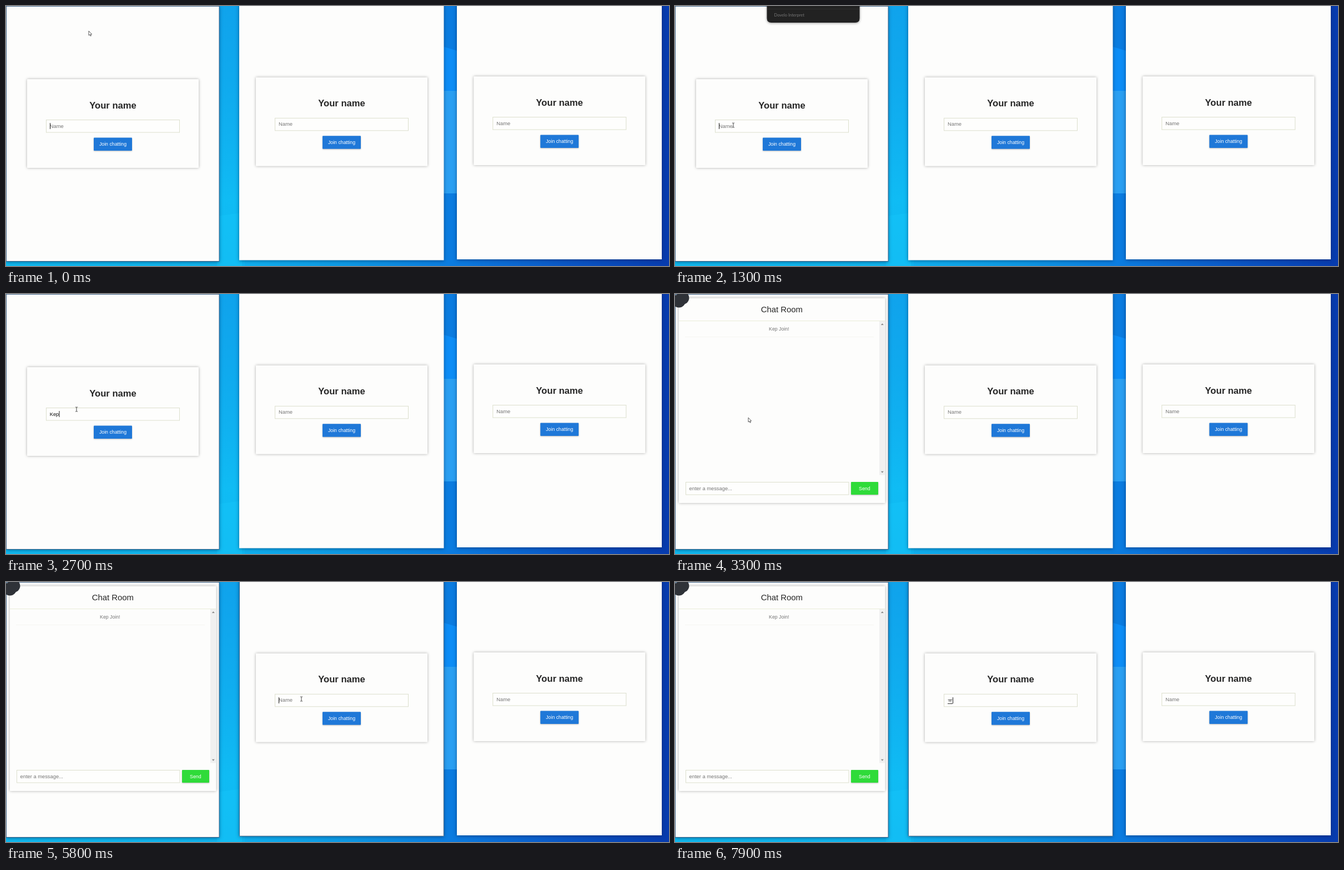
An HTML page that plays this animation: 1194 px wide and 469 px high, repeating every 8000 ms.

```html
<!DOCTYPE html>
<html lang="en">
<head>
<meta charset="utf-8">
<title>Chat rooms</title>
<style>
  html, body { margin: 0; width: 100%; height: 100%; overflow: hidden; background: #0fb4f0; }
  svg { display: block; width: 1194px; height: 469px; font-family: "Liberation Sans", Arial, sans-serif; }
  .page { fill: #fdfdfc; }
  .win { filter: drop-shadow(0 1px 3px rgba(0, 20, 60, .5)); }
  .card { fill: #fdfdfc; filter: drop-shadow(0 0 2.5px rgba(0, 0, 0, .32)); }
  .field { fill: #fefefd; stroke: #dcdfcd; }
  .blue { fill: #1f78d8; }
  .green { fill: #2fdb3a; }
  .btn { filter: drop-shadow(0 1px 1px rgba(0, 0, 0, .25)); }
  .mid { text-anchor: middle; }
  .title { font-size: 16.6px; font-weight: 700; fill: #262626; }
  .room { font-size: 14.9px; fill: #262626; }
  .hint { font-size: 9.35px; fill: #757575; }
  .typed { font-size: 9.35px; fill: #111; }
  .label { font-size: 8.75px; fill: #fff; }
  .note { font-size: 8.75px; fill: #757575; }
  .edge { fill: none; stroke: #3f6388; }
  .jamo { font-family: "Noto Sans CJK KR", "Noto Sans CJK", sans-serif; font-size: 9.6px; fill: #222; }
  .popup { font-family: Lato, sans-serif; font-size: 7.5px; fill: #777; }

  /* One shared 8 s clock; 1% is 80 ms. */
  .anim { animation: 8s step-end infinite; }
  #login { animation-name: login; }
  #chat { animation-name: chat; }
  #hint1 { animation-name: hint1; }
  #k1 { animation-name: key1; }
  #k2 { animation-name: key2; }
  #k3 { animation-name: key3; }
  #caret1 { animation-name: caret1; }
  #hint2 { animation-name: hint2; }
  #compose { animation-name: compose; }
  #caret2 { animation-name: caret2; }
  #focus2 { animation-name: focus2; }
  #arrow { animation-name: arrow; }
  #beam { animation-name: beam; }
  #popup { animation: popup 8s ease-out infinite; }
  #pointer { animation: pointer 8s ease-in-out infinite; }

  @keyframes login { 0% { opacity: 1 } 38.125%, 100% { opacity: 0 } }
  @keyframes chat { 0% { opacity: 0 } 38.125%, 100% { opacity: 1 } }
  @keyframes hint1 { 0% { opacity: 1 } 27.5%, 100% { opacity: 0 } }
  @keyframes key1 { 0% { opacity: 0 } 27.5%, 100% { opacity: 1 } }
  @keyframes key2 { 0% { opacity: 0 } 29.375%, 100% { opacity: 1 } }
  @keyframes key3 { 0% { opacity: 0 } 31.25%, 100% { opacity: 1 } }
  @keyframes caret1 {
    0%, 13.25% { opacity: 1; transform: none }
    6.625%, 19.875% { opacity: 0; transform: none }
    26.5% { opacity: 1; transform: none }
    27.5% { opacity: 1; transform: translateX(6.2px) }
    29.375% { opacity: 1; transform: translateX(11.4px) }
    31.25%, 100% { opacity: 1; transform: translateX(16.5px) }
  }
  @keyframes hint2 { 0% { opacity: 1 } 92.5%, 100% { opacity: 0 } }
  @keyframes compose { 0% { opacity: 0 } 92.5%, 100% { opacity: 1 } }
  @keyframes caret2 {
    0% { opacity: 0; transform: none }
    70%, 83.25% { opacity: 1; transform: none }
    76.625%, 89.875% { opacity: 0; transform: none }
    92.5%, 100% { opacity: 1; transform: translateX(9px) }
  }
  @keyframes focus2 { 0% { opacity: 0 } 70%, 100% { opacity: 1 } }
  @keyframes arrow {
    0%, 38.125%, 61% { opacity: 1 }
    11.5%, 53.5%, 68.5%, 100% { opacity: 0 }
  }
  @keyframes beam {
    0%, 38.125%, 61%, 92.5%, 100% { opacity: 0 }
    11.5%, 53.5%, 68.5% { opacity: 1 }
  }
  @keyframes popup {
    0%, 10% { transform: translateY(-34px) }
    13%, 20% { transform: none }
    22.5%, 100% { transform: translateY(-34px) }
  }
  @keyframes pointer {
    0%, 3% { transform: translate(149px, 45px) }
    13%, 25% { transform: translate(105px, 215px) }
    32%, 36% { transform: translate(127px, 208px) }
    40%, 43% { transform: translate(132px, 223px) }
    55%, 60% { transform: translate(159px, 349px) }
    69.5%, 100% { transform: translate(532px, 211px) }
  }
</style>
</head>
<body>
<svg viewBox="0 0 1194 469">
  <defs>
    <linearGradient id="sky">
      <stop offset="0" stop-color="#0fb9f0"/>
      <stop offset=".34" stop-color="#0fb2ef"/>
      <stop offset=".52" stop-color="#0d98e4"/>
      <stop offset=".67" stop-color="#0b7ce0"/>
      <stop offset=".85" stop-color="#0a55c4"/>
      <stop offset="1" stop-color="#073bae"/>
    </linearGradient>
    <linearGradient id="glow" x1="0" y1="0" x2="0" y2="1">
      <stop offset="0" stop-color="#1187e6" stop-opacity=".35"/>
      <stop offset=".75" stop-color="#10c4f8" stop-opacity=".55"/>
      <stop offset="1" stop-color="#10bdf2" stop-opacity=".4"/>
    </linearGradient>
    <g id="form">
      <rect class="card" x="38" y="132" width="309" height="160" rx="1"/>
      <text class="title mid" x="192.5" y="184.7">Your name</text>
      <rect class="field" x="72.5" y="205.5" width="240" height="22.5"/>
      <rect class="btn blue" x="158" y="237.5" width="69" height="23.5" rx="1"/>
      <text class="label mid" x="192.5" y="252">Join chatting</text>
    </g>
  </defs>

  <rect width="1194" height="469" fill="url(#sky)"/>
  <rect width="430" height="469" fill="url(#glow)"/>
  <path d="M380 379L425 373V469H380Z" fill="#18c8fa" opacity=".35"/>
  <path d="M780 71L820 83V153H780Z" fill="#0f94ff" opacity=".7"/>
  <rect x="628" y="153" width="185" height="185" fill="#2a9ff2"/>

  <g class="win"><rect class="page" width="384" height="461"/></g>
  <rect class="edge" x=".5" y=".5" width="383.5" height="460"/>
  <g id="login" class="anim">
    <use href="#form"/>
    <text id="hint1" class="hint anim" x="78.7" y="219.7">Name</text>
    <text class="typed" x="78.7" y="219.7"><tspan id="t1"></tspan></text>
    <text id="k1" class="typed anim" x="78.7" y="219.7">K</text>
    <text id="k2" class="typed anim" x="84.9" y="219.7">e</text>
    <text id="k3" class="typed anim" x="90.1" y="219.7">p</text>
    <rect id="caret1" class="anim" x="79" y="211" width="1" height="11" fill="#222"/>
  </g>

  <g id="chat" class="anim">
    <rect class="card" x="7" y="7.5" width="371.5" height="369.5" rx="1"/>
    <text class="room mid" x="192.3" y="32.8">Chat Room</text>
    <path d="M7 48.5H378.5" stroke="#e9ecd9"/>
    <path d="M18 77.5H358" stroke="#f6f6f1"/>
    <text class="note mid" x="187.3" y="65.7">Kep Join!</text>
    <rect x="368" y="49" width="10.5" height="277.5" fill="#f0f0f0"/>
    <path d="M370.8 56L373.3 53L375.8 56ZM370.8 319.8L373.3 322.8L375.8 319.8Z" fill="#8a8a8a"/>
    <rect class="field" x="19.5" y="339.5" width="293.5" height="22.5"/>
    <text class="hint" x="25.5" y="354">enter a message...</text>
    <rect class="btn green" x="317" y="339" width="49" height="23" rx="1"/>
    <text class="label mid" x="341.3" y="353.7">Send</text>
    <g fill="#2f3238"><circle cx="7" cy="12.5" r="12"/><circle cx="14" cy="7" r="11.5"/></g>
  </g>

  <g class="win"><rect class="page" x="420" y="-4" width="368.5" height="462.5"/></g>
  <path id="focus2" class="edge anim" d="M420.5 0V458.3H788.3V0"/>
  <use href="#form" x="412" y="-3.2"/>
  <text id="hint2" class="hint anim" x="491" y="216.3">Name</text>
  <g id="compose" class="anim">
    <text class="jamo" x="491" y="217.3">ㅠ</text>
    <path d="M491 219.5H500" stroke="#333"/>
  </g>
  <rect id="caret2" class="anim" x="491" y="208" width="1" height="11" fill="#222"/>

  <g class="win"><rect class="page" x="812" y="-4" width="369" height="461"/></g>
  <use href="#form" x="804.3" y="-5"/>
  <text class="hint" x="883.2" y="214.8">Name</text>

  <g id="popup">
    <path d="M165.5 -6H332.5V22Q332.5 30 324.5 30H173.5Q165.5 30 165.5 22Z" fill="#222"
      style="filter: drop-shadow(0 1px 2px rgba(0, 0, 0, .4))"/>
    <path d="M166 5.5H332" stroke="#303030"/>
    <text class="popup" x="178.5" y="18.7">Dovelo Interpret</text>
  </g>

  <g id="pointer">
    <path id="arrow" class="anim" d="M0 0V8L1.9 6.5L3.1 9.2L4.4 8.6L3.2 6H5.6Z"
      fill="#fff" stroke="#333" stroke-width=".8"/>
    <path id="beam" class="anim" d="M-2 -4H-.5L0 -3.5L.5 -4H2M0 -3.5V3.5M-2 4H-.5L0 3.5L.5 4H2"
      fill="none" stroke="#333" stroke-width=".9"/>
  </g>
</svg>
</body>
</html>
```
